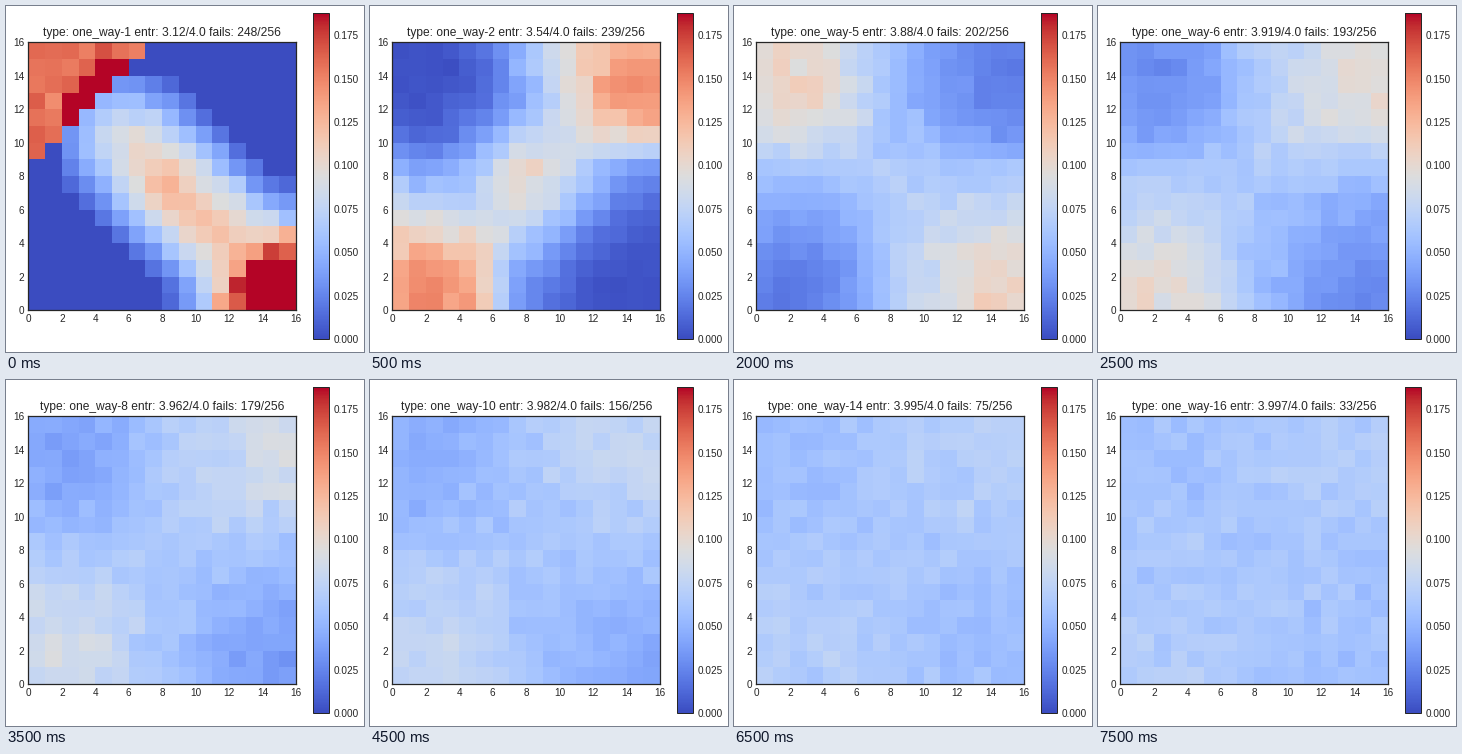
A matplotlib script that plays this animation: 358x346 px, repeating every 8 s.

```python
import numpy as np
import matplotlib.pyplot as plt
from matplotlib.animation import FuncAnimation

W, H, DPI = 358, 346, 72
N, VMAX = 16, 0.1875
STEPS, DECAY, TRIALS = 16, 0.83, 5000
INK = "0.15"

ENTROPY = [3.12, 3.54, 3.721, 3.821, 3.88, 3.919, 3.945, 3.962,
           3.974, 3.982, 3.987, 3.991, 3.994, 3.995, 3.996, 3.997]
FAILS = [248, 239, 221, 211, 202, 193, 187, 179,
         169, 156, 138, 118, 97, 75, 53, 33]

plt.rcParams.update({
    "font.family": "Liberation Sans",
    "text.color": INK,
    "axes.edgecolor": INK,
    "axes.linewidth": 1.25,
    "xtick.color": INK,
    "ytick.color": INK,
})


def one_pass():
    """Chance that a card moves from column to row in a single shuffle."""
    row, col = np.mgrid[:N, :N]
    along = col - row
    across = col + row - (N - 1)

    # Ridge that falls off to both sides and swells towards the last cards.
    peak = np.interp(along, [-8, -6, -3, 0, 4, 8, 10, 11, 12, 15],
                     [.05, .08, .1, .122, .117, .115, .14, .2, .21, .27])
    width = 8 + 0.4 * np.maximum(0, along - 6)
    reach = np.clip(across / width, -1, 1)
    p = peak * np.cos(np.pi / 2 * reach) ** 2
    p[(p < 0.008) | (row >= N - 2) | (col < 2)] = 0

    # The first packet fills a triangle of its own.
    first = along <= -9
    p[first] = 0.16
    p[first & (along >= -10) & (across >= -2) & (row < N - 1)] = 0.21
    return p


def balance(p):
    p = p.copy()
    for _ in range(80):
        p /= p.sum(axis=0, keepdims=True)
        p /= p.sum(axis=1, keepdims=True)
    return p


START = one_pass()
DRIFT = balance(START) - 1 / N
DRIFT *= DECAY / np.abs(np.linalg.eigvals(DRIFT)).max()


def sample(k):
    """Measured chances after k shuffles."""
    p = START if k == 1 else 1 / N + np.linalg.matrix_power(DRIFT, k)
    p = np.clip(p, 0, 1)
    noise = np.random.default_rng(k).standard_normal((N, N))
    return np.clip(p + noise * np.sqrt(p * (1 - p) / TRIALS), 0, 1)


def add_axes(x, y, w, h):
    """Axes placed in pixels from the top left corner."""
    return fig.add_axes([x / W, 1 - (y + h) / H, w / W, h / H])


fig = plt.figure(figsize=(W / DPI, H / DPI), dpi=DPI, facecolor="white")
ax = add_axes(22.3, 36.3, 267.84, 267.84)
mesh = ax.pcolormesh(sample(1), cmap="coolwarm", vmin=0, vmax=VMAX)
ax.set(xlim=(0, N), ylim=(0, N),
       xticks=range(0, N + 1, 2), yticks=range(0, N + 1, 2))
ax.tick_params(length=0, labelsize=10, pad=4)
title = ax.set_title("", fontsize=12, pad=6)

bar = fig.colorbar(mesh, cax=add_axes(307, 7.4, 16.3, 325.6),
                   ticks=np.arange(0, 0.18, 0.025), format="%.3f")
bar.ax.tick_params(length=0, labelsize=10, pad=4)
bar.outline.set_linewidth(1)


def draw(i):
    mesh.set_array(sample(i + 1))
    title.set_text(f"type: one_way-{i + 1} entr: {ENTROPY[i]}/4.0 "
                   f"fails: {FAILS[i]}/256")
    return mesh, title


anim = FuncAnimation(fig, draw, frames=STEPS, interval=500,
                     repeat=True, repeat_delay=0, blit=False)
plt.show()
```
